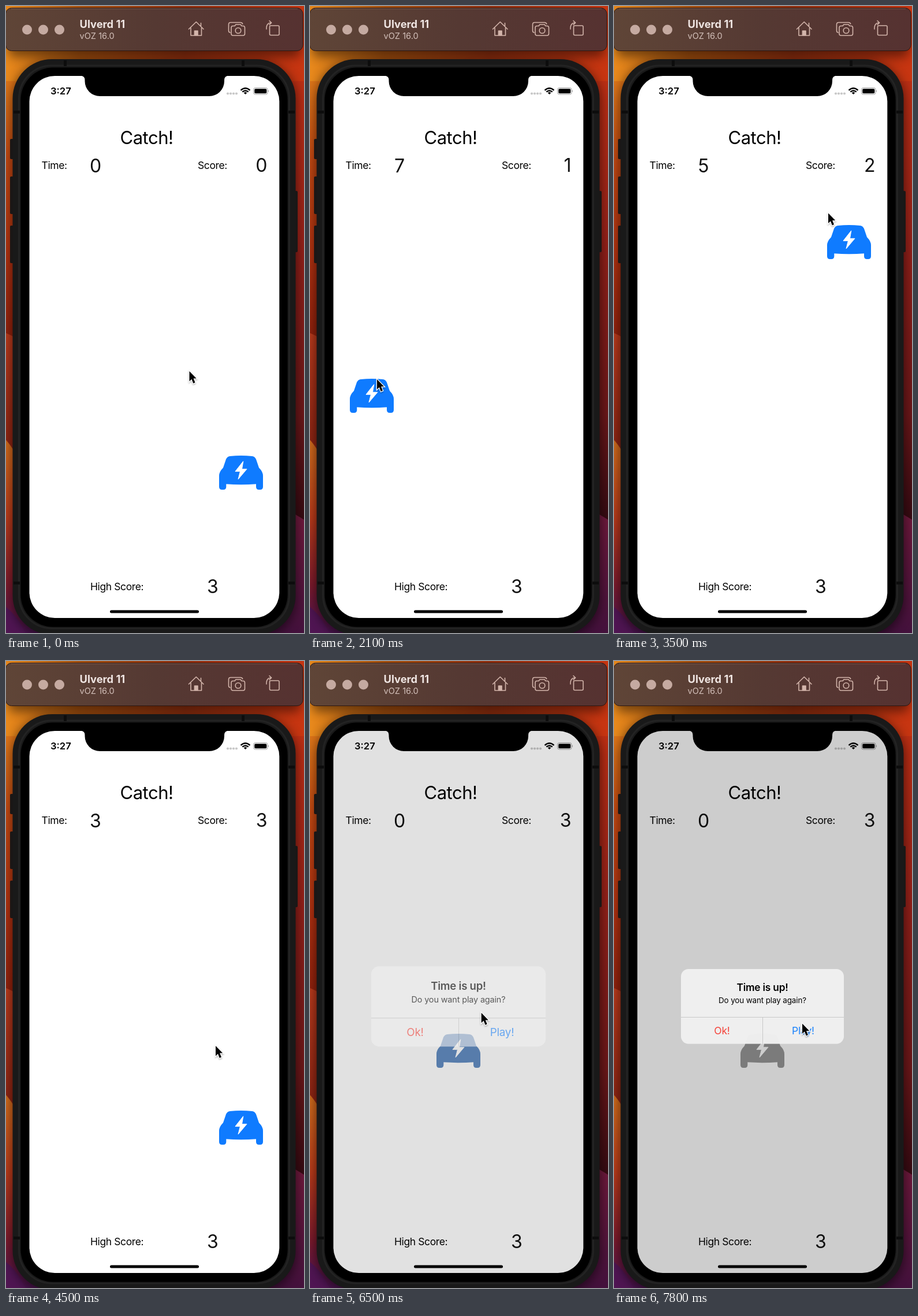
An HTML page that plays this animation: 516x1085 px, repeating every 8 s.

```html
<!DOCTYPE html>
<html lang="en">
<head>
<meta charset="utf-8">
<title>Catch</title>
<style>
  html, body { margin: 0; width: 100%; height: 100%; overflow: hidden; background: #000; }
  svg { display: block; width: 100%; height: 100%; }
  text { font-family: Inter, Roboto, sans-serif; }
  .mid { text-anchor: middle; }
  .label { font-size: 17.5px; letter-spacing: -.4px; }
  .num { font-size: 32px; fill: #111; }
</style>
</head>
<body>
<svg viewBox="0 0 516 1085" xmlns="http://www.w3.org/2000/svg">
  <defs>
    <linearGradient id="left" x2="0" y2="1">
      <stop offset="0" stop-color="#e8891c"/>
      <stop offset=".14" stop-color="#d86f17"/>
      <stop offset=".24" stop-color="#c24812"/>
      <stop offset=".4" stop-color="#ae3010"/>
      <stop offset=".54" stop-color="#8c1f0c"/>
      <stop offset="1" stop-color="#5c130c"/>
    </linearGradient>
    <linearGradient id="right" x2="0" y2="1">
      <stop offset="0" stop-color="#cc3812"/>
      <stop offset=".15" stop-color="#b52c14"/>
      <stop offset=".4" stop-color="#8e1f19"/>
      <stop offset=".65" stop-color="#6a1719"/>
      <stop offset=".82" stop-color="#350a12"/>
    </linearGradient>
    <linearGradient id="top">
      <stop offset="0" stop-color="#e8891c"/>
      <stop offset=".25" stop-color="#a9520f"/>
      <stop offset=".6" stop-color="#94300f"/>
      <stop offset="1" stop-color="#c83511"/>
    </linearGradient>
    <linearGradient id="hillA" x2="0" y2="1">
      <stop offset="0" stop-color="#b93a1c"/>
      <stop offset="1" stop-color="#6a130c"/>
    </linearGradient>
    <linearGradient id="hillB" x2="0" y2="1">
      <stop offset="0" stop-color="#d06c1c"/>
      <stop offset=".4" stop-color="#b93a1a"/>
      <stop offset=".75" stop-color="#7c1a2c"/>
      <stop offset="1" stop-color="#4a1350"/>
    </linearGradient>
    <linearGradient id="hillC" x2="0" y2="1">
      <stop offset="0" stop-color="#741a3c"/>
      <stop offset="1" stop-color="#43113c"/>
    </linearGradient>
    <linearGradient id="bar">
      <stop offset="0" stop-color="#5f4537"/>
      <stop offset=".5" stop-color="#553933"/>
      <stop offset="1" stop-color="#563231"/>
    </linearGradient>
    <filter id="soft" x="-20%" y="-60%" width="140%" height="220%"><feGaussianBlur stdDeviation="9"/></filter>
    <filter id="drop" x="-50%" y="-50%" width="200%" height="200%">
      <feDropShadow dx="0" dy="1.5" stdDeviation="1.2" flood-opacity=".32"/>
    </filter>
    <clipPath id="glass"><rect x="40.500" y="121" width="432.800" height="938" rx="44"/></clipPath>
  </defs>

  <!-- wallpaper -->
  <rect width="258" height="1085" fill="url(#left)"/>
  <rect x="258" width="258" height="1085" fill="url(#right)"/>
  <rect width="516" height="130" fill="url(#top)"/>
  <path d="M0 566Q30 578 60 610V900H0Z" fill="url(#hillA)"/>
  <path d="M0 751Q16 768 60 850V1085H0Z" fill="url(#hillB)"/>
  <path d="M0 1040Q20 1056 34 1085H0Z" fill="#4f1552"/>
  <path d="M516 889Q490 872 440 850V1085H516Z" fill="url(#hillC)"/>
  <rect x="10" y="96" width="493" height="998" rx="68" opacity=".5" filter="url(#soft)"/>
  <rect x="4" y="14" width="506" height="74" rx="10" opacity=".45" filter="url(#soft)"/>

  <!-- simulator bar -->
  <rect x="-.5" y="3.5" width="514.5" height="74" rx="10" fill="url(#bar)" stroke="#2c1712"/>
  <path d="M9 4.8H505" stroke="#8a6a5c" opacity=".7"/>
  <g fill="#c5aaa1"><circle cx="36.5" cy="41" r="8.5"/><circle cx="64.5" cy="41" r="8.5"/><circle cx="92.5" cy="41" r="8.5"/></g>
  <text x="127.5" y="38" font-size="18.3" font-weight="700" fill="#f0e6e3">Ulverd 11</text>
  <text x="127.5" y="57" font-size="14.6" fill="#d3c0ba">vOZ 16.0</text>
  <g fill="none" stroke="#d3b5ab" stroke-width="1.6" stroke-linejoin="round" stroke-linecap="round">
    <path d="M316.500 40L329.300 27.500L342 40M320 38V51H338.500V38M337.500 35V29.500"/>
    <path d="M326.500 50.500V43H332V50.500Z" fill="#d3b5ab"/>
    <path d="M388 46Q385.500 45.500 385.500 42.500V32Q385.500 28.500 389 28.500H406Q409 28.500 409.700 31"/>
    <path d="M393 34.500H396L398 32H406L408 34.500H410.500Q413.500 34.500 413.500 37.500V48Q413.500 51 410.500 51H393Q390 51 390 48V37.500Q390 34.500 393 34.500Z"/>
    <circle cx="402" cy="42.500" r="4.800"/>
    <rect x="456.500" y="34" width="16.500" height="16.500" rx="2"/>
    <path d="M451 40Q450.500 29 459.500 29M456 25.500L459.700 29L456 32.500"/>
  </g>

  <!-- phone -->
  <g fill="#1b1716">
    <rect x="7" y="230" width="10" height="35" rx="2"/>
    <rect x="7" y="295" width="10" height="65" rx="2"/>
    <rect x="7" y="380" width="10" height="65" rx="2"/>
    <rect x="495" y="320" width="10" height="106" rx="2"/>
  </g>
  <rect x="11.500" y="92" width="490" height="996" rx="68" fill="#191919"/>
  <rect x="22.500" y="103" width="468" height="974" rx="57" fill="none" stroke="#232323" stroke-width="3"/>
  <path d="M13 183.500H24M13 998.500H24M489 183.500H500M489 998.500H500M102.500 94V104M410.500 94V104" stroke="#0d0d0d" stroke-width="5"/>
  <rect x="25.500" y="106.500" width="462" height="968" rx="56"/>

  <g clip-path="url(#glass)">
    <rect x="40" y="121" width="434" height="938" fill="#fff"/>
    <text x="77" y="153" font-size="16.600" font-weight="600">3:27</text>
    <g fill="#c8c8c8"><circle cx="384" cy="151.500" r="2.100"/><circle cx="389" cy="151.500" r="2.100"/><circle cx="394" cy="151.500" r="2.100"/><circle cx="399" cy="151.500" r="2.100"/></g>
    <g fill="none" stroke="#000" stroke-width="2.400">
      <path d="M406.500 145.800Q414.500 138.700 422.500 145.800M409.300 148.700Q414.500 144.200 419.700 148.700"/>
      <path d="M414.500 153L411.700 150.200Q414.500 148 417.300 150.200Z" fill="#000" stroke="none"/>
    </g>
    <rect x="428.500" y="141.500" width="24.500" height="11.500" rx="3.300" fill="none" stroke="#a0a0a0"/>
    <rect x="430.200" y="143.200" width="21.100" height="8.100" rx="1.800"/>
    <path d="M454 145.300Q456 147.200 454 149.200Z" fill="#a0a0a0"/>

    <text class="mid" x="243.500" y="238.500" font-size="31" letter-spacing="-.5">Catch!</text>
    <text class="label" x="61.500" y="282">Time:</text>
    <text class="label" x="332" y="282">Score:</text>
    <text class="label" x="146" y="1011">High Score:</text>
    <text class="num mid" id="time" x="155" y="287.500"></text>
    <text class="num" id="score" x="452.500" y="287" text-anchor="end"></text>
    <text class="num mid" x="358" y="1016">3</text>

    <g id="car">
      <path id="body" d="M19 1Q38 -1 57 1C61 1.400 63.400 4 64.600 8L69 21Q76 28 76 35V54Q76 59 71 59H69Q64 59 64 54V49.300Q38 51 12.300 49.300V54Q12.300 59 7.300 59H5Q0 59 0 54V35Q0 28 7 21L11.400 8C12.600 4 15 1.400 19 1Z"/>
      <path d="M41.800 9.800L28 27.300H36.500L33 41L48 23.300H39.500Z" fill="#fff" stroke="#fff" stroke-linejoin="round"/>
    </g>
    <rect x="180" y="1045.500" width="154" height="5" rx="2.500"/>
    <rect id="shade" x="40" y="121" width="434" height="938"/>

    <g id="alert">
      <rect x="116" y="533" width="282" height="129.500" rx="13" fill="#f1f1f1" fill-opacity=".97"/>
      <path d="M116 616.500H398M257.500 617V662.500" stroke="#c8c8c8"/>
      <g class="mid">
        <text x="257" y="570.500" font-size="17.300" font-weight="600" letter-spacing="-.2">Time is up!</text>
        <text x="257" y="591.500" font-size="13.400" letter-spacing="-.1">Do you want play again?</text>
        <text x="187" y="646" font-size="17.500" fill="#f5433a" letter-spacing="-.2">Ok!</text>
        <text x="327.500" y="646" font-size="17.500" fill="#1a82fb" letter-spacing="-.2">Play!</text>
      </g>
    </g>
  </g>
  <path d="M129 120.500Q136.500 121 136.500 128V130A26 26 0 0 0 162.500 156H352A26 26 0 0 0 378 130V128Q378 121 385.500 120.500Z"/>

  <path id="cursor" d="M0 0V17.500L3.900 13.800L6.800 20.900L10 19.500L7.100 12.600H12.200Z" stroke="#fff" stroke-width="2.400" paint-order="stroke" filter="url(#drop)"/>
</svg>
<script>
const LOOP = 8000, STEP = 100;
const FIRST_TICK = 600, TICK = 640, ALERT_AT = 6400;
// grid cell of the car (3 columns), before the first tick and after each one
const cells = [11, 7, 4, 6, 1, 2, 4, 11, 5, 9, 7];
const catches = [1100, 2300, 3800];
// pointer stops: time, x, y
const stops = [
  [0, 317.5, 632], [600, 317.5, 632], [1000, 262, 668], [1300, 262, 668],
  [2100, 116, 646], [2300, 108, 666], [2700, 108, 664], [3500, 371, 358.5],
  [3700, 398, 398], [4000, 402, 402], [4500, 363, 666], [4900, 374, 715],
  [5800, 380, 426], [6200, 376, 424], [6600, 282, 643], [7000, 326, 627.5]
];
const $ = id => document.getElementById(id);
const [time, score, car, body, shade, alertBox, cursor] =
  ["time", "score", "car", "body", "shade", "alert", "cursor"].map($);

const mix = (a, b, k) => a + (b - a) * k;
const ease = k => k * k * (3 - 2 * k);

function pointer(t) {
  const i = stops.findIndex(s => s[0] > t);
  if (i < 0) return stops[stops.length - 1].slice(1);
  const a = stops[i - 1], b = stops[i];
  const k = ease((t - a[0]) / (b[0] - a[0]));
  return [mix(a[1], b[1], k), mix(a[2], b[2], k)];
}

function alertProgress(t) {
  if (t < ALERT_AT) return 0;
  return t >= 6900 ? 1 : 1 - Math.exp((ALERT_AT - t) / 109);
}

function draw(t) {
  const ticks = t < FIRST_TICK ? 0 : Math.min(10, 1 + Math.floor((t - FIRST_TICK) / TICK));
  time.textContent = ticks ? 10 - ticks : 0;
  score.textContent = catches.filter(c => c <= t).length;

  const cell = cells[ticks];
  car.setAttribute("transform", `translate(${69 + cell % 3 * 150} ${379 + Math.floor(cell / 3) * 133})`);

  const p = alertProgress(t);
  const tint = [15, 123, 255].map(c => Math.round(mix(c, 153, p)));
  body.setAttribute("fill", `rgb(${tint})`);
  shade.setAttribute("opacity", .195 * p);
  alertBox.setAttribute("opacity", p);
  alertBox.setAttribute("transform", `translate(257 597.8) scale(${mix(1.18, 1, p)}) translate(-257 -597.8)`);

  cursor.setAttribute("transform", `translate(${pointer(t)})`);
}

const start = performance.now();
function loop() {
  const t = (performance.now() - start) % LOOP;
  draw(Math.floor(t / STEP) * STEP);
  requestAnimationFrame(loop);
}
loop();
</script>
</body>
</html>
```
